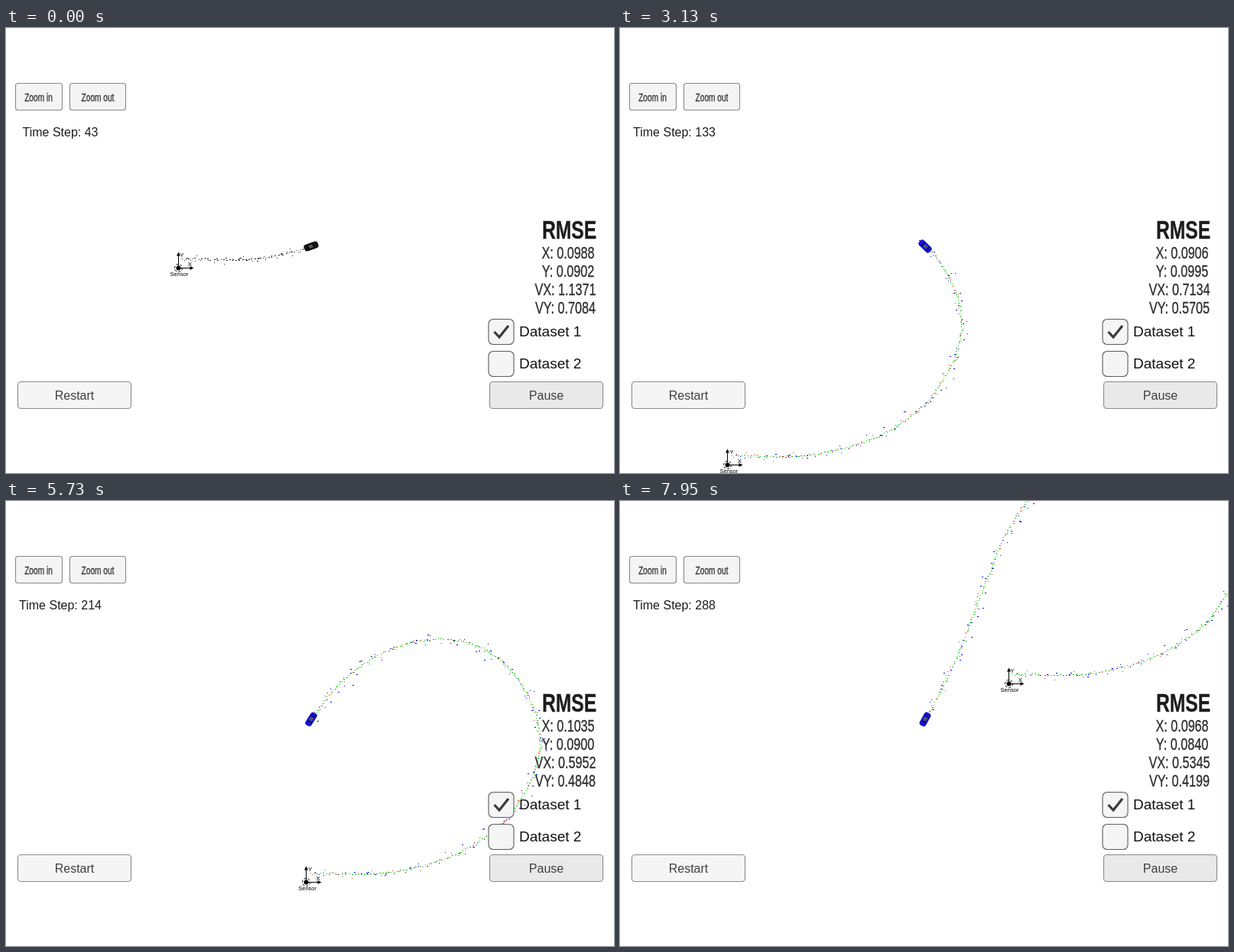
Write an HTML page with a canvas that moves like this. It is 795 by 583 pixels and loops after 8000 ms.

```html
<!DOCTYPE html>
<html>
<head>
<meta charset="utf-8">
<title>Tracking simulator</title>
<style>
  html, body { margin: 0; width: 100%; height: 100%; overflow: hidden; background: #fff; }
  canvas { display: block; }
</style>
</head>
<body>
<canvas id="stage" width="795" height="583"></canvas>
<script>
const ctx = document.getElementById('stage').getContext('2d');
const LOOP = 8000;
const LAST_STEP = 288;
const CAR = { x: 399, y: 286 };
const FONT = '"Liberation Sans", Arial, sans-serif';
const NARROW = { squeeze: 0.725, bold: 0.35 };

// Time in ms -> time step
const pace = [
  [0, 43], [830, 86], [1870, 117], [3130, 133],
  [4570, 159], [5730, 214], [6990, 270], [7950, LAST_STEP]
];

// Car positions relative to the sensor, one every SPACING steps
const SPACING = 24;
const route = [
  [6, -12], [104, -12.5], [191.5, -35], [263, -85.5], [304, -166], [288, -248.5], [226, -308.5],
  [140, -315], [58, -273.5], [3, -207], [-34, -122.5], [-67, -36], [-108.5, 47.5], [-153, 118]
];

// Root mean square errors as functions of the time step
const errors = [
  ['X', s => 0.1028 - 0.000092 * s + 0.0205 / (1 + Math.exp((185 - s) / 6))],
  ['Y', s => 0.0917 + 0.0078 * Math.cos((s - 128) / 48)],
  ['VX', s => 0.155 + 6.44 / Math.sqrt(s)],
  ['VY', s => 0.89 - 0.0277 * Math.sqrt(s)]
];

function stepAt(time) {
  const next = Math.max(1, pace.findIndex(key => key[0] > time));
  if (time >= pace.at(-1)[0]) return LAST_STEP;
  const [t0, s0] = pace[next - 1], [t1, s1] = pace[next];
  return Math.round(s0 + (s1 - s0) * (time - t0) / (t1 - t0));
}

function position(step) {
  const i = Math.min(Math.floor(step / SPACING), route.length - 3);
  const u = step / SPACING - i;
  const b = route[i], c = route[i + 1], d = route[i + 2];
  const a = route[i - 1] || [2 * b[0] - c[0], 2 * b[1] - c[1]];
  const spline = k => b[k] + 0.5 * u * (c[k] - a[k]
    + u * (2 * a[k] - 5 * b[k] + 4 * c[k] - d[k] + u * (3 * (b[k] - c[k]) + d[k] - a[k])));
  return { x: spline(0), y: spline(1) };
}

function random(n) {
  const v = Math.sin(n * 127.1 + 11.7) * 43758.5453;
  return v - Math.floor(v);
}
const gauss = n => (random(n) + random(n + .31) + random(n + .57) + random(n + .83) - 2) * 1.73;

// Per step: an estimate on the route and one laser or radar measurement
const dots = [];
for (let step = 0; step <= LAST_STEP; step++) {
  const p = position(step);
  const n1 = gauss(step), n2 = gauss(step + 400);
  const wide = random(step + 50) < .5 ? 2 : 1;
  dots.push({ step, color: '#0c0', x: p.x + gauss(step + 900) * .5, y: p.y + gauss(step + 1300) * .5, w: wide });
  if (step % 2) {
    const range = Math.hypot(p.x, p.y) + n1 * 4.2;
    const angle = Math.atan2(p.y, p.x) + n2 * .022;
    dots.push({ step, color: '#00e', x: range * Math.cos(angle), y: range * Math.sin(angle), w: wide });
  } else {
    dots.push({ step, color: '#f03030', x: p.x + n1 * 2.2, y: p.y + n2 * 2.2, w: 1 });
  }
}

function text(str, x, y, size, color, { align = 'center', weight = '', squeeze = 1, bold = 0 } = {}) {
  ctx.save();
  ctx.translate(x, y);
  ctx.scale(squeeze, 1);
  ctx.font = `${weight} ${size}px ${FONT}`;
  ctx.textAlign = align;
  ctx.fillStyle = ctx.strokeStyle = color;
  ctx.fillText(str, 0, 0);
  if (bold) {
    ctx.lineWidth = bold;
    ctx.strokeText(str, 0, 0);
  }
  ctx.restore();
}

function box(x, y, w, h, radius, fill, stroke) {
  ctx.beginPath();
  ctx.roundRect(x + .5, y + .5, w, h, radius);
  ctx.fillStyle = fill;
  ctx.fill();
  ctx.lineWidth = 1.1;
  ctx.strokeStyle = stroke;
  ctx.stroke();
}

function polygon(...points) {
  ctx.beginPath();
  points.forEach(([x, y]) => ctx.lineTo(x, y));
  ctx.fill();
}

function drawSensor(x, y) {
  ctx.save();
  ctx.translate(Math.round(x) + .5, Math.round(y) + .5);
  ctx.fillStyle = ctx.strokeStyle = '#000';
  ctx.lineWidth = 1;
  ctx.beginPath();
  ctx.moveTo(0, -18);
  ctx.lineTo(0, 0);
  ctx.lineTo(17, 0);
  ctx.stroke();
  polygon([0, -21], [-2.5, -16], [2.5, -16]);
  polygon([20, 0], [15, -2.5], [15, 2.5]);
  ctx.beginPath();
  ctx.arc(0, 0, 3, 0, 7);
  ctx.fill();
  ctx.setLineDash([3, 2]);
  ctx.beginPath();
  ctx.arc(0, 0, 5, 0, 7);
  ctx.stroke();
  ctx.restore();
  text('Y', x + 5.5, y - 14, 8, '#000');
  text('X', x + 16, y - 2, 8, '#000');
  text('Sensor', x + 2, y + 11, 7.5, '#000');
}

function drawCar(step, muted) {
  const a = position(step - 3), b = position(step + 2);
  ctx.save();
  ctx.translate(CAR.x, CAR.y);
  ctx.rotate(Math.atan2(b.y - a.y, b.x - a.x));
  box(-9.5, -4.5, 18, 8, 3, muted ? '#161616' : '#1414f0', muted ? '#000' : '#1010a0');
  ctx.fillStyle = '#555560';
  ctx.fillRect(-3, -2, 5, 4);
  ctx.fillStyle = muted ? '#000' : '#08083c';
  ctx.fillRect(3, -3, 1.5, 6);
  ctx.fillRect(-5.5, -3, 1.5, 6);
  ctx.restore();
}

function drawWorld(step) {
  const p = position(step);
  const sx = CAR.x - p.x, sy = CAR.y - p.y;
  const muted = step < 72;
  for (const dot of dots) {
    if (dot.step > step) break;
    ctx.fillStyle = muted ? '#222' : dot.color;
    ctx.fillRect(Math.round(sx + dot.x), Math.round(sy + dot.y), dot.w, 1);
  }
  drawSensor(sx, sy);
  drawCar(step, muted);
}

function drawPanel(step) {
  box(12, 72, 61, 35, 3, '#f4f4f4', '#8a8a8a');
  box(83, 72, 73, 35, 3, '#f4f4f4', '#8a8a8a');
  text('Zoom in', 42.5, 95.5, 14, '#3a3a3a', NARROW);
  text('Zoom out', 120, 95.5, 14, '#3a3a3a', NARROW);
  text('Time Step: ' + step, 71, 142, 16, '#1c1c1c');

  text('RMSE', 736.5, 275.7, 34, '#1c1c1c', { ...NARROW, weight: 'bold' });
  errors.forEach(([label, value], i) =>
    text(`${label}: ${value(step).toFixed(4)}`, i < 2 ? 735 : 731.5, 302 + i * 24, 22.3, '#2c2c2c', NARROW));

  for (const i of [0, 1]) {
    const y = 381 + i * 42;
    box(630.5, y, 33, 33, 6, '#f5f5f5', '#5c5c5c');
    text('Dataset ' + (i + 1), 671, y + 23, 19, '#111', { align: 'left' });
  }
  ctx.beginPath();
  ctx.moveTo(638.5, 398);
  ctx.lineTo(645, 405);
  ctx.lineTo(657, 390);
  ctx.lineWidth = 3.2;
  ctx.strokeStyle = '#3a3a3a';
  ctx.stroke();

  box(15, 463, 148, 35, 4, '#f5f5f5', '#8a8a8a');
  box(632, 463, 148, 35, 4, '#e9e9e9', '#8a8a8a');
  text('Restart', 89.5, 487, 16, '#404040');
  text('Pause', 706.5, 487, 16, '#404040');
}

function render(time) {
  const step = stepAt(time % LOOP);
  ctx.fillStyle = '#fff';
  ctx.fillRect(0, 0, 795, 583);
  drawWorld(step);
  drawPanel(step);
}

const start = performance.now();
function frame() {
  render(performance.now() - start);
  requestAnimationFrame(frame);
}
frame();
</script>
</body>
</html>
```
